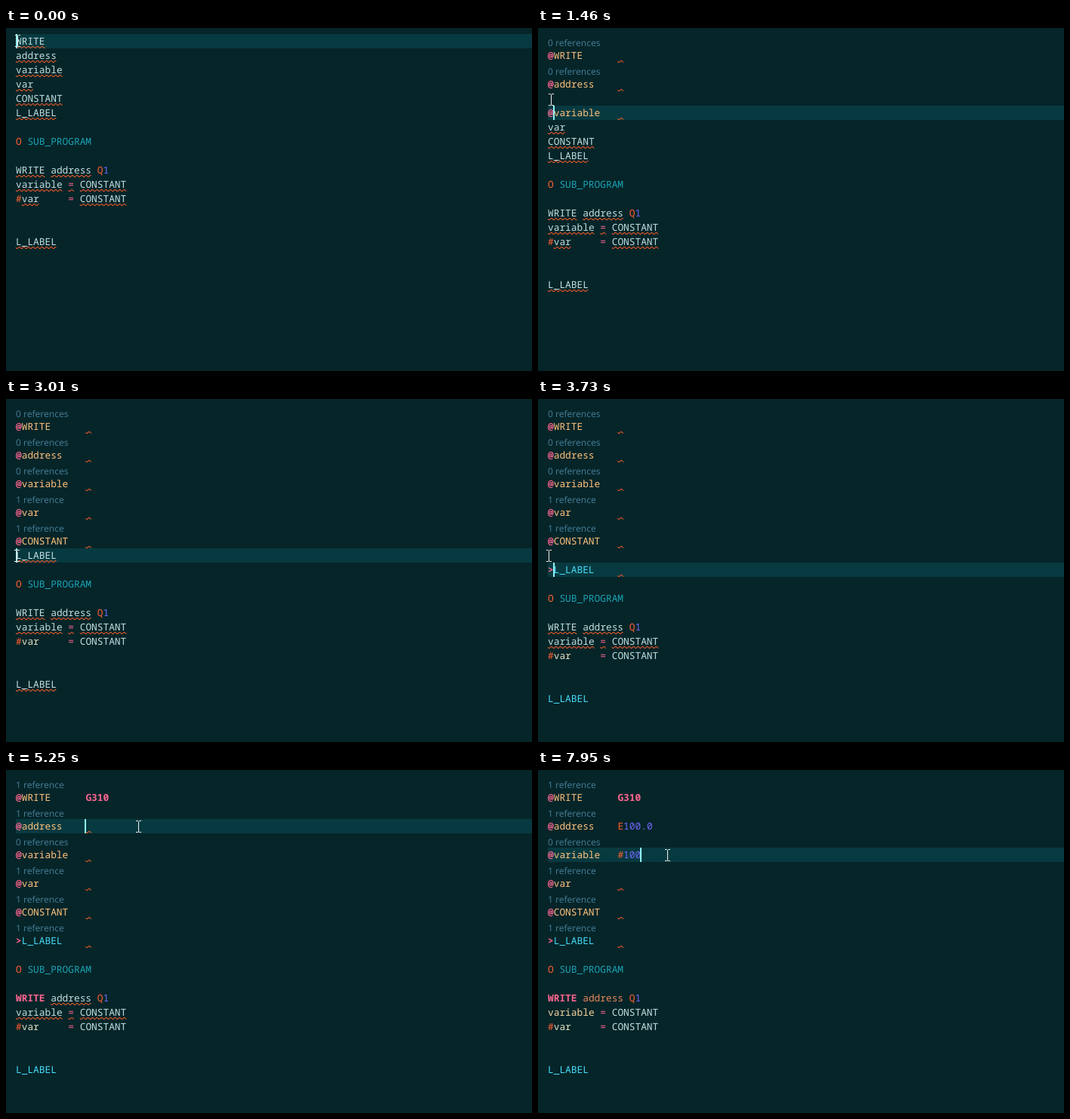
These frames come from a looping animation (696 by 455 pixels, 8 s). An HTML page:

```html
<!DOCTYPE html>
<html lang="en">
<head>
<meta charset="utf-8">
<title>Editor labels</title>
<style>
  html, body { margin: 0; width: 100%; height: 100%; overflow: hidden; background: #052529; }
  svg { display: block; width: 696px; height: 455px; }
  text { font: 12.833px "Noto Sans Mono", "DejaVu Sans Mono", monospace; white-space: pre; text-rendering: geometricPrecision; }
  text.bold { font-weight: 700; }
  text.lens { font: 12px "Noto Sans", "Open Sans", sans-serif; }
</style>
</head>
<body>
<svg id="stage" viewBox="0 0 696 455"></svg>
<script>
const LOOP = 8000, LEFT = 13, TOP = 8, LINE = 19, CHAR = 7.7, VALUE_COL = 12;
const color = {
  bg: '#052529', line: '#073a40', plain: '#c3e0e2', lens: '#437a93', pink: '#ff6590',
  tag: '#ffc27d', cyan: '#48dcfa', orange: '#ff6031', purple: '#7467fa', teal: '#1ca3b4',
  address: '#e8895c', variable: '#f6d5a0', local: '#dfe3c4', squiggle: '#f25a28', caret: '#8ff4f4'
};

// typed: prefix appears; clean: warnings resolve; gap: lens row opens; lens: its text appears
const labels = [
  { name: 'WRITE',    typed: 270,  clean: 360,  gap: 450,  lens: 540,  used: 4950 },
  { name: 'address',  typed: 930,  clean: 1000, gap: 1000, lens: 1100, used: 5250 },
  { name: 'variable', typed: 1370, clean: 1460, gap: 1460, lens: 1730, used: Infinity },
  { name: 'var',      typed: 2000, clean: 2090, gap: 2090, lens: 2170, used: 0 },
  { name: 'CONSTANT', typed: 2640, clean: 2730, gap: 2730, lens: 3010, used: 0 },
  { name: 'L_LABEL',  typed: 3470, clean: 3580, gap: 3730, lens: 3930, used: 0 }
];
const values = [
  { text: 'G310',   keys: [4500, 4590, 4800, 4870] },
  { text: 'E100.0', keys: [5900, 6000, 6100, 6190, 6470, 6470] },
  { text: '#100',   keys: [7590, 7590, 7770, 7950] }
];
const FILLING = 4320;
const clicks = [[0, 0], [810, 1], [1280, 2], [1910, 3], [2550, 4], [3010, 5], [FILLING, 0], [5250, 1], [7020, 2]];
const caretOff = [[5620, 5900], [7380, 7590]];
const pointer = [
  [0, 15, 17], [630, 15, 36], [720, 16, 49], [810, 16, 56], [930, 18, 78], [1190, 17, 87], [1280, 17, 95],
  [1820, 16, 123], [1910, 16, 132], [2090, 16, 158], [2360, 16, 165], [2450, 15, 169],
  [2830, 14, 194], [3010, 14, 208], [4030, 38, 162], [4130, 112, 92], [4220, 164, 48],
  [4320, 171, 35], [5250, 175, 75], [7020, 171, 113]
];

const latest = (list, t) => list.filter(item => item[0] <= t).pop();
const colX = col => LEFT + col * CHAR;
const rowY = row => TOP + row * LINE;
const typedValue = (k, t) => values[k] ? values[k].text.slice(0, values[k].keys.filter(key => key <= t).length) : '';
const rect = (x, y, w, h, fill) => `<rect x="${x}" y="${y}" width="${w}" height="${h}" fill="${fill}"/>`;
const escapeText = s => s.replace('>', '&gt;');

// Zigzag with a 6px period: first trough at 1.75px, first peak at 4.75px
function squiggle(row, col, length) {
  const points = [];
  for (let x = 0; x <= length * CHAR; x += 0.5) {
    const y = Math.abs((x + 4.25) % 6 - 3);
    points.push(`${(colX(col) + x).toFixed(1)},${rowY(row) + 16 + Math.min(2.5, Math.max(0.5, y))}`);
  }
  return `<polyline points="${points.join(' ')}" fill="none" stroke="${color.squiggle}" stroke-width="1.05"/>`;
}

function token(row, col, text, fill = color.plain, wavy = false, cls = '') {
  return `<text class="${cls}" x="${colX(col)}" y="${rowY(row) + 14}" fill="${fill}">${escapeText(text)}</text>` +
    (wavy ? squiggle(row, col, text.length) : '');
}

function lensText(row, used) {
  return `<text class="lens" x="${LEFT}" y="${rowY(row) + 16}" fill="${color.lens}">${used ? '1 reference' : '0 references'}</text>`;
}

function valueTokens(row, k, text) {
  if (k === 0) return token(row, VALUE_COL, text, color.pink, false, 'bold');
  return token(row, VALUE_COL, text[0], color.orange) + token(row, VALUE_COL + 1, text.slice(1), color.purple);
}

function labelLine(row, k, t) {
  const { name, typed, clean } = labels[k], isJump = k === 5;
  if (t < typed) return token(row, 0, name, color.plain, true);
  const value = typedValue(k, t);
  let out = token(row, 0, isJump ? '>' : '@', color.pink, false, 'bold') +
    token(row, 1, name, isJump ? color.cyan : color.tag, t < clean);
  if (value) out += valueTokens(row, k, value);
  else if (t >= clean) out += squiggle(row, VALUE_COL, 1);
  return out;
}

function program(row, t) {
  const defined = k => t >= labels[k].clean;
  const command = t >= 4950, address = t >= 6190, variable = t >= 7590;
  return token(row + 1, 0, 'O', color.orange) + token(row + 1, 2, 'SUB_PROGRAM', color.teal) +
    token(row + 3, 0, 'WRITE', command ? color.pink : color.plain, !command, command ? 'bold' : '') +
    token(row + 3, 6, 'address', address ? color.address : color.plain, !address) +
    token(row + 3, 14, 'Q', color.orange) + token(row + 3, 15, '1', color.purple) +
    token(row + 4, 0, 'variable', variable ? color.variable : color.plain, !variable) +
    token(row + 4, 9, '=', color.pink, !variable) +
    token(row + 4, 11, 'CONSTANT', color.plain, !variable) +
    token(row + 5, 0, '#', color.orange) +
    token(row + 5, 1, 'var', defined(3) ? color.local : color.plain, !defined(3)) +
    token(row + 5, 9, '=', color.pink) +
    token(row + 5, 11, 'CONSTANT', color.plain, !defined(4)) +
    token(row + 8, 0, 'L_LABEL', defined(5) ? color.cyan : color.plain, !defined(5));
}

function occurrences(rows, length) {
  return rows.map(row => rect(LEFT, rowY(row), length * CHAR, LINE, 'rgba(87,87,87,.6)')).join('');
}

function iBeam([, x, y]) {
  const shape = `M${x - 3} ${y - 7.5}h2.5l1 1l1-1h2.5M${x + .5} ${y - 6.5}v14M${x - 3} ${y + 7.5}h2.5l1-1l1 1h2.5`;
  return `<path d="${shape}" fill="none" stroke="#f4f4f4"/>`;
}

function picture(t) {
  const rows = [];
  let row = 0, text = '';
  labels.forEach((label, k) => {
    if (t >= label.gap) {
      if (t >= label.lens) text += lensText(row, t >= label.used);
      row++;
    }
    rows[k] = row;
    text += labelLine(row++, k, t);
  });
  text += program(row, t);

  const active = latest(clicks, t)[1];
  const y = rowY(rows[active]);
  const col = t >= FILLING ? VALUE_COL + typedValue(active, t).length : +(t >= labels[active].typed);
  let out = rect(0, 0, 696, 455, color.bg) + rect(LEFT, y, 696 - LEFT, LINE, color.line);
  if (t >= 90 && t < 270) out += occurrences([rows[0], row + 3], 5);
  if (t >= 3190 && t < 3470) out += occurrences([rows[5], row + 8], 7);
  out += text;
  if (!caretOff.some(([from, to]) => t >= from && t < to)) {
    out += rect(Math.max(LEFT, Math.round(colX(col)) - 1), y, 2, LINE, color.caret);
  }
  return out + iBeam(latest(pointer, t));
}

const stage = document.getElementById('stage');
let shown = '';
function draw(now) {
  const next = picture(now % LOOP);
  if (next !== shown) stage.innerHTML = shown = next;
}
const start = performance.now();
function tick() {
  draw(performance.now() - start);
  requestAnimationFrame(tick);
}
tick();
</script>
</body>
</html>
```
